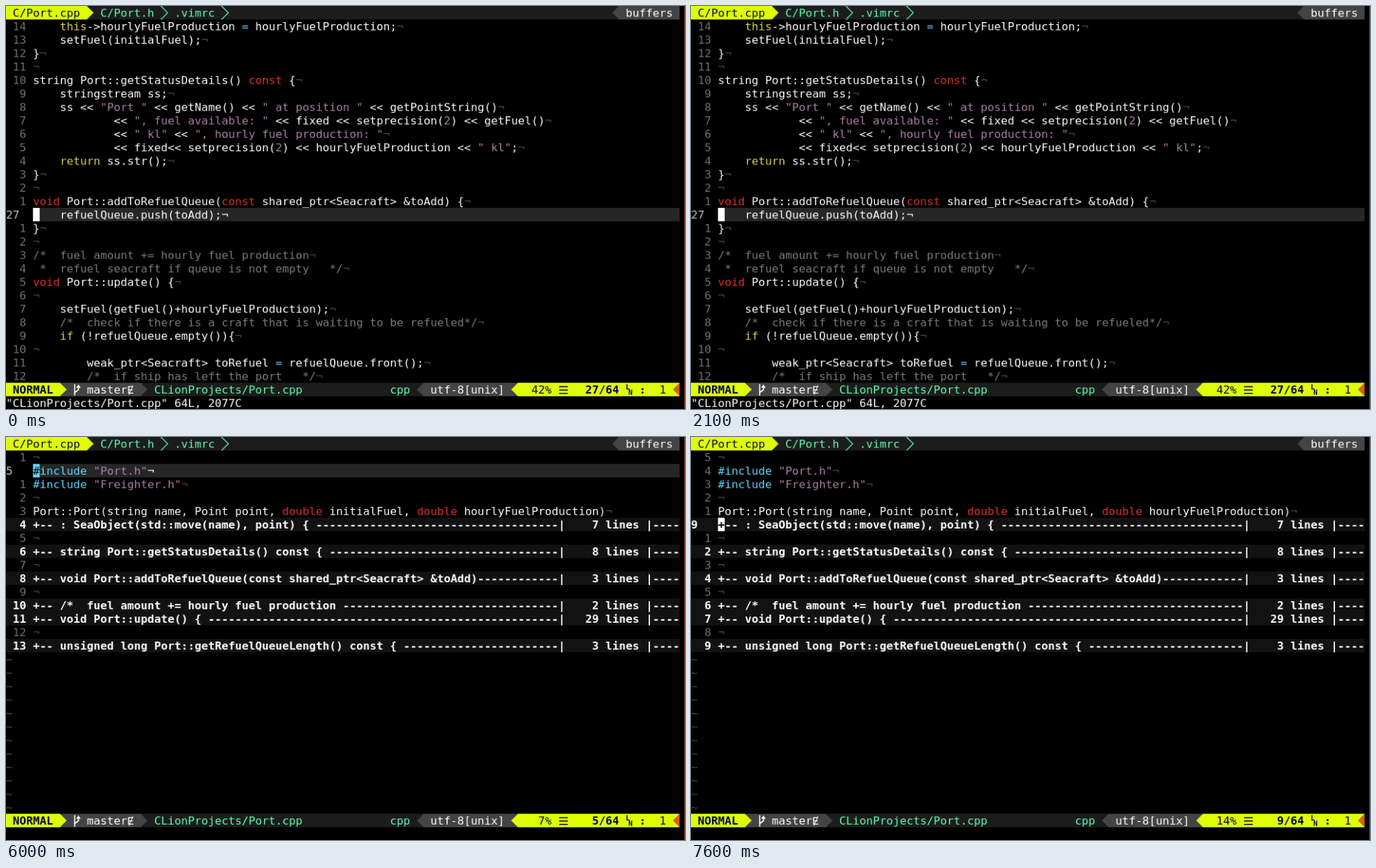
These frames come from a looping animation (971 px wide and 577 px high, 8 s). An HTML page with a canvas:

```html
<!DOCTYPE html>
<html>
<head>
<meta charset="utf-8">
<style>
html, body { margin: 0; width: 100%; height: 100%; overflow: hidden; background: #000; }
canvas { display: block; }
</style>
</head>
<body>
<canvas id="stage" width="971" height="577"></canvas>
<script>
// The terminal is drawn on a whole-pixel grid and scaled down to the stage.
const stage = document.getElementById('stage');
const terminal = document.createElement('canvas');
terminal.width = 1008;
terminal.height = 599;
const ctx = terminal.getContext('2d');
const CELL_W = 10, CELL_H = 20, COLS = 100, BASELINE = 16, GUTTER = 4;
const LOOP = 8000;
const C = {
  text: '#ffffff', red: '#e0302c', yellow: '#e0d050', cyan: '#5fd7ff', string: '#ad7fa8',
  comment: '#7c7c7c', eol: '#4a4a4a', number: '#707070', currentNumber: '#c6c6c6',
  cursorLine: '#262626', fold: '#121212',
  lime: '#dfff00', navy: '#00005f', gray: '#444444', bar: '#1c1c1c', mint: '#5fffaf', orange: '#d75f00'
};

const openCode = `    this->hourlyFuelProduction = hourlyFuelProduction;
    setFuel(initialFuel);
}

string Port::getStatusDetails() const {
    stringstream ss;
    ss << "Port " << getName() << " at position " << getPointString()
            << ", fuel available: " << fixed << setprecision(2) << getFuel()
            << " kl" << ", hourly fuel production: "
            << fixed<< setprecision(2) << hourlyFuelProduction << " kl";
    return ss.str();
}

void Port::addToRefuelQueue(const shared_ptr<Seacraft> &toAdd) {
    refuelQueue.push(toAdd);
}

/*  fuel amount += hourly fuel production
 *  refuel seacraft if queue is not empty   */
void Port::update() {

    setFuel(getFuel()+hourlyFuelProduction);
    /*  check if there is a craft that is waiting to be refueled*/
    if (!refuelQueue.empty()){

        weak_ptr<Seacraft> toRefuel = refuelQueue.front();
        /*  if ship has left the port   */`.split('\n').map((text, i) => ({ line: 13 + i, text }));

const foldedCode = [
  [4, ''],
  [5, '#include "Port.h"'],
  [6, '#include "Freighter.h"'],
  [7, ''],
  [8, 'Port::Port(string name, Point point, double initialFuel, double hourlyFuelProduction)'],
  [9, ': SeaObject(std::move(name), point) { ', 7],
  [16, ''],
  [17, 'string Port::getStatusDetails() const { ', 8],
  [25, ''],
  [26, 'void Port::addToRefuelQueue(const shared_ptr<Seacraft> &toAdd)', 3],
  [29, ''],
  [30, '/*  fuel amount += hourly fuel production ', 2],
  [32, 'void Port::update() { ', 29],
  [61, ''],
  [62, 'unsigned long Port::getRefuelQueueLength() const { ', 3]
].map(([line, text, folded]) => ({ line, text, folded }));

const open = (time, line, blink) =>
  ({ time, rows: openCode, line, blink, message: '"CLionProjects/Port.cpp" 64L, 2077C' });
const folded = (time, line, top = 4) =>
  ({ time, rows: foldedCode.filter(r => r.line >= top), line, message: '' });

const timeline = [
  open(0, 27), open(200, 28), open(400, 29), open(500, 30), open(600, 31), open(700, 30),
  open(800, 28), open(900, 27), open(1000, 26), open(1100, 27), open(1500, 27, true), open(2000, 27),
  folded(5600, 5, 5), folded(5800, 4), folded(6000, 5), folded(6300, 7),
  folded(6600, 9), folded(7200, 16), folded(7600, 9)
];

const colX = col => col * CELL_W;
const rowY = row => row * CELL_H;

function fill(row, from, to, color) {
  ctx.fillStyle = color;
  ctx.fillRect(colX(from), rowY(row), colX(to - from), CELL_H);
}

function write(row, col, text, color, bold = false) {
  ctx.font = (bold ? 'bold ' : '') + '16.6px "DejaVu Sans Mono", monospace';
  ctx.fillStyle = color;
  [...text].forEach((ch, i) => {
    if (ch !== ' ') ctx.fillText(ch, colX(col + i), rowY(row) + BASELINE);
  });
}

// Powerline separator filling one cell; dir 1 points right, -1 points left.
function arrow(row, col, dir, color, thin = false) {
  const base = colX(dir > 0 ? col : col + 1), tip = colX(dir > 0 ? col + 1 : col);
  const top = rowY(row);
  ctx.beginPath();
  ctx.moveTo(base, top);
  ctx.lineTo(tip, top + CELL_H / 2);
  ctx.lineTo(base, top + CELL_H);
  if (thin) {
    ctx.strokeStyle = color;
    ctx.lineWidth = 1.3;
    ctx.stroke();
  } else {
    ctx.fillStyle = color;
    ctx.fill();
  }
}

const syntax = [
  [/^(\/\*.*| \* .*)/, C.comment],
  [/^"[^"]*"/, C.string],
  [/^(void|const|double)\b/, C.red],
  [/^(this|return|if)\b/, C.yellow],
  [/^(#include|=)/, C.cyan],
  [/^\d+/, C.string],
  [/^(\w+|\s|.)/, C.text]
];

function tokenize(text) {
  const tokens = [];
  for (let col = 0; col < text.length;) {
    const rest = text.slice(col);
    const [pattern, color] = syntax.find(([p]) => p.test(rest));
    const word = rest.match(pattern)[0];
    tokens.push({ col, word, color });
    col += word.length;
  }
  return tokens;
}

function foldText({ text, folded }) {
  return ('+-- ' + text).padEnd(78, '-') + '|' + String(folded).padStart(5) + ' lines |----';
}

function drawRow(item, row, distance, blink) {
  const current = distance === 0;
  const label = current ? String(item.line) : String(distance).padStart(3);
  let cursorColor = C.text, cursorChar = item.text[0] || ' ';

  if (item.folded) {
    const text = foldText(item);
    fill(row, 0, COLS, C.fold);
    write(row, 0, label, C.text, true);
    write(row, GUTTER, text, C.text, true);
    cursorChar = text[0];
  } else {
    if (current) fill(row, GUTTER, COLS, C.cursorLine);
    write(row, 0, label, current ? C.currentNumber : C.number);
    const tokens = tokenize(item.text);
    for (const t of tokens) write(row, GUTTER + t.col, t.word, t.color);
    write(row, GUTTER + item.text.length, '¬', current ? C.text : C.eol);
    if (tokens.length) cursorColor = tokens[0].color;
    else cursorChar = '¬';
  }
  if (current && !blink) {
    fill(row, GUTTER, GUTTER + 1, cursorColor);
    write(row, GUTTER, cursorChar, '#000', !!item.folded);
  }
}

function drawTabs() {
  fill(0, 0, COLS, C.bar);
  fill(0, 0, 12, C.lime);
  arrow(0, 12, 1, C.lime);
  write(0, 1, 'C/Port.cpp', C.navy);
  write(0, 14, 'C/Port.h', C.mint);
  arrow(0, 23, 1, C.mint, true);
  write(0, 25, '.vimrc', C.mint);
  arrow(0, 32, 1, C.mint, true);
  arrow(0, 90, -1, C.gray);
  fill(0, 91, COLS, C.gray);
  write(0, 92, 'buffers', C.text);
}

function drawBranch(x, y) {
  ctx.strokeStyle = C.text;
  ctx.lineWidth = 1.7;
  ctx.beginPath();
  ctx.moveTo(x + 2, y + 2);
  ctx.lineTo(x + 2, y + 19);
  ctx.moveTo(x + 2, y + 14.5);
  ctx.lineTo(x + 7.5, y + 10.5);
  ctx.lineTo(x + 7.5, y + 5);
  ctx.moveTo(x + 5, y + 7.5);
  ctx.lineTo(x + 7.5, y + 4);
  ctx.lineTo(x + 10, y + 7.5);
  ctx.stroke();
}

function drawStatus(line) {
  const row = 28, y = rowY(row);
  fill(row, 0, COLS, C.bar);
  fill(row, 8, 20, C.gray);
  fill(row, 0, 8, C.lime);
  arrow(row, 8, 1, C.lime);
  write(row, 1, 'NORMAL', C.navy, true);
  drawBranch(colX(10), y);
  write(row, 12, 'masterɆ', C.text);
  arrow(row, 20, 1, C.gray);
  write(row, 22, 'CLionProjects/Port.cpp', C.mint);
  write(row, 57, 'cpp', C.mint);
  arrow(row, 61, -1, C.gray);
  fill(row, 62, 76, C.gray);
  write(row, 63, 'utf-8[unix]', C.text);
  arrow(row, 75, -1, C.lime);
  fill(row, 76, COLS, C.lime);
  write(row, 78, (Math.floor(line / 64 * 100) + '%').padStart(3), C.navy);
  for (const dy of [5, 10, 15]) ctx.fillRect(821, y + dy, 13, 1.5);
  write(row, 86, (line + '/64').padStart(5), C.navy, true);
  ctx.font = 'bold 10px "DejaVu Sans Mono", monospace';
  ctx.fillText('L', colX(92), y + 10);
  ctx.fillText('N', colX(92) + 4, y + 18);
  write(row, 94, ':', C.navy, true);
  write(row, 97, '1', C.navy);
  arrow(row, 99, -1, C.orange);
}

function draw({ rows, line, blink, message }) {
  ctx.fillStyle = '#000';
  ctx.fillRect(0, 0, terminal.width, terminal.height);
  const cursor = rows.findIndex(r => r.line === line);
  rows.forEach((item, i) => drawRow(item, i + 1, Math.abs(i - cursor), blink));
  for (let row = rows.length + 1; row < 28; row++) write(row, 0, '~', C.eol);
  drawTabs();
  drawStatus(line);
  write(29, 0, message, C.text);
  ctx.fillStyle = '#8a4218';
  ctx.fillRect(terminal.width - 1, 0, 1, terminal.height);

  const view = stage.getContext('2d');
  view.imageSmoothingQuality = 'low';
  view.drawImage(terminal, 0, 0, stage.width, stage.height);
}

const start = performance.now();
let shown;
function tick() {
  const time = (performance.now() - start) % LOOP;
  const state = timeline.findLast(s => s.time <= time);
  if (state !== shown) draw(shown = state);
  requestAnimationFrame(tick);
}
tick();
</script>
</body>
</html>
```
